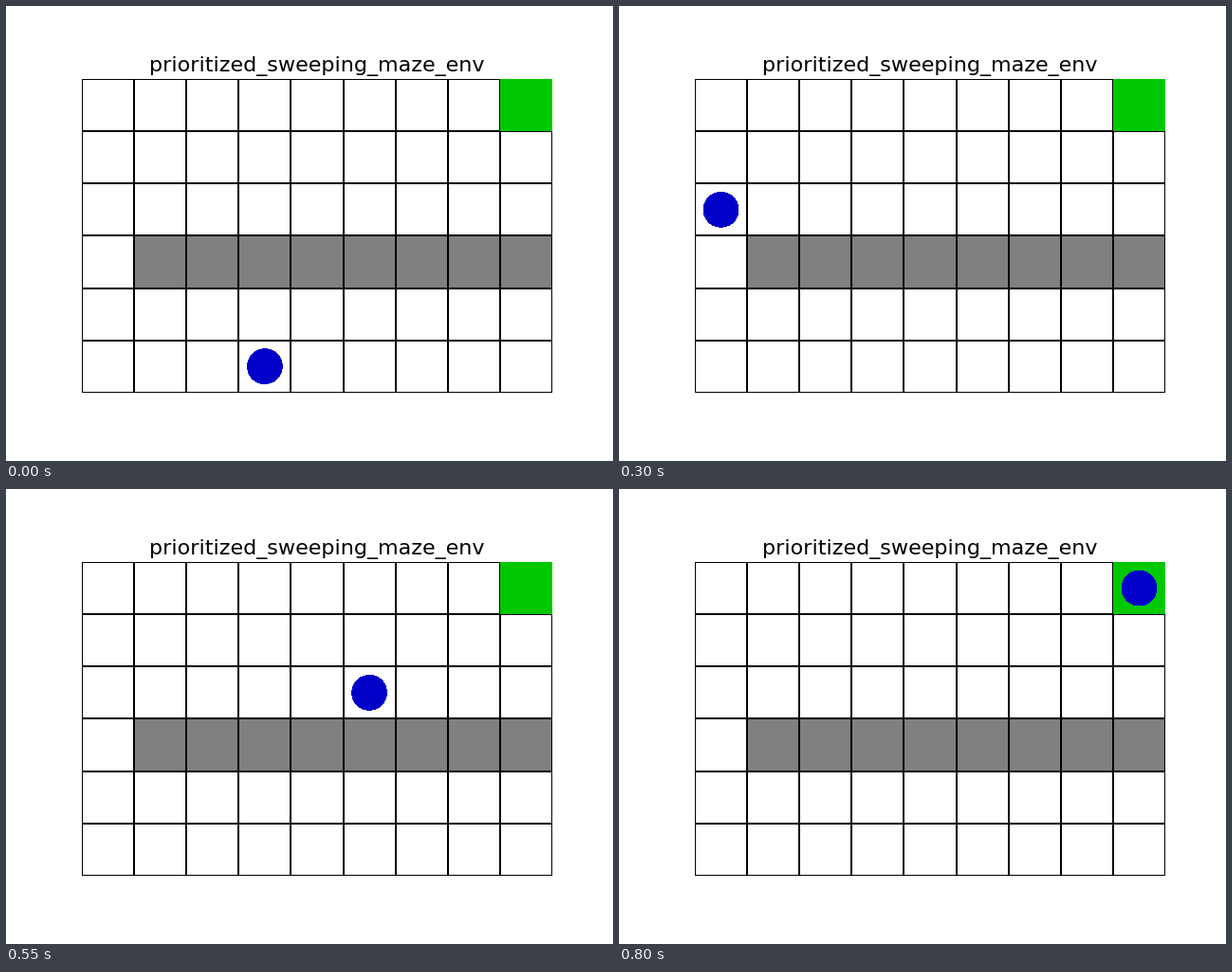
A matplotlib script that plays this animation: 640 px wide and 480 px high, repeating every 850 ms.

```python
import numpy as np
import matplotlib.pyplot as plt
from matplotlib.animation import FuncAnimation
from matplotlib.patches import Circle, Rectangle

COLS, ROWS = 9, 6
START, GOAL = (3, 0), (8, 5)
BLUE, GREEN, GREY = "#0000c8", "#00c800", "#808080"
STEP = {"L": (-1, 0), "R": (1, 0), "U": (0, 1)}
MOVES = "LLL" + "UUU" + "R" * 8 + "UU"


def walk(start, moves):
    """Cells visited, one per frame."""
    steps = [start] + [STEP[m] for m in moves]
    return np.cumsum(steps, axis=0)


def block(cell, width, color, zorder):
    ax.add_patch(Rectangle(cell, width, 1, facecolor=color, linewidth=0,
                           zorder=zorder))


path = walk(START, MOVES)

fig, ax = plt.subplots(figsize=(6.4, 4.8), dpi=100)
ax.set_aspect("equal")
ax.set_xlim(0, COLS)
ax.set_ylim(0, ROWS)
ax.axis("off")
ax.set_title("prioritized_sweeping_maze_env", fontsize=16,
             family="DejaVu Sans")

# Two-pixel grid lines; the outer ones are halved by the axes' clip box.
line = dict(color="black", linewidth=1.44, snap=True, zorder=2)
for x in range(COLS + 1):
    ax.axvline(x, **line)
for y in range(ROWS + 1):
    ax.axhline(y, **line)

block((1, 2), COLS - 1, GREY, zorder=1)
block(GOAL, 1, GREEN, zorder=3)
agent = ax.add_patch(Circle((0, 0), 1 / 3, facecolor=BLUE, linewidth=0,
                            antialiased=False, zorder=4))


def draw(frame):
    agent.center = tuple(path[frame] + 0.5)
    return [agent]


anim = FuncAnimation(fig, draw, frames=len(path), interval=50,
                     repeat=True, repeat_delay=0)
plt.show()
```
